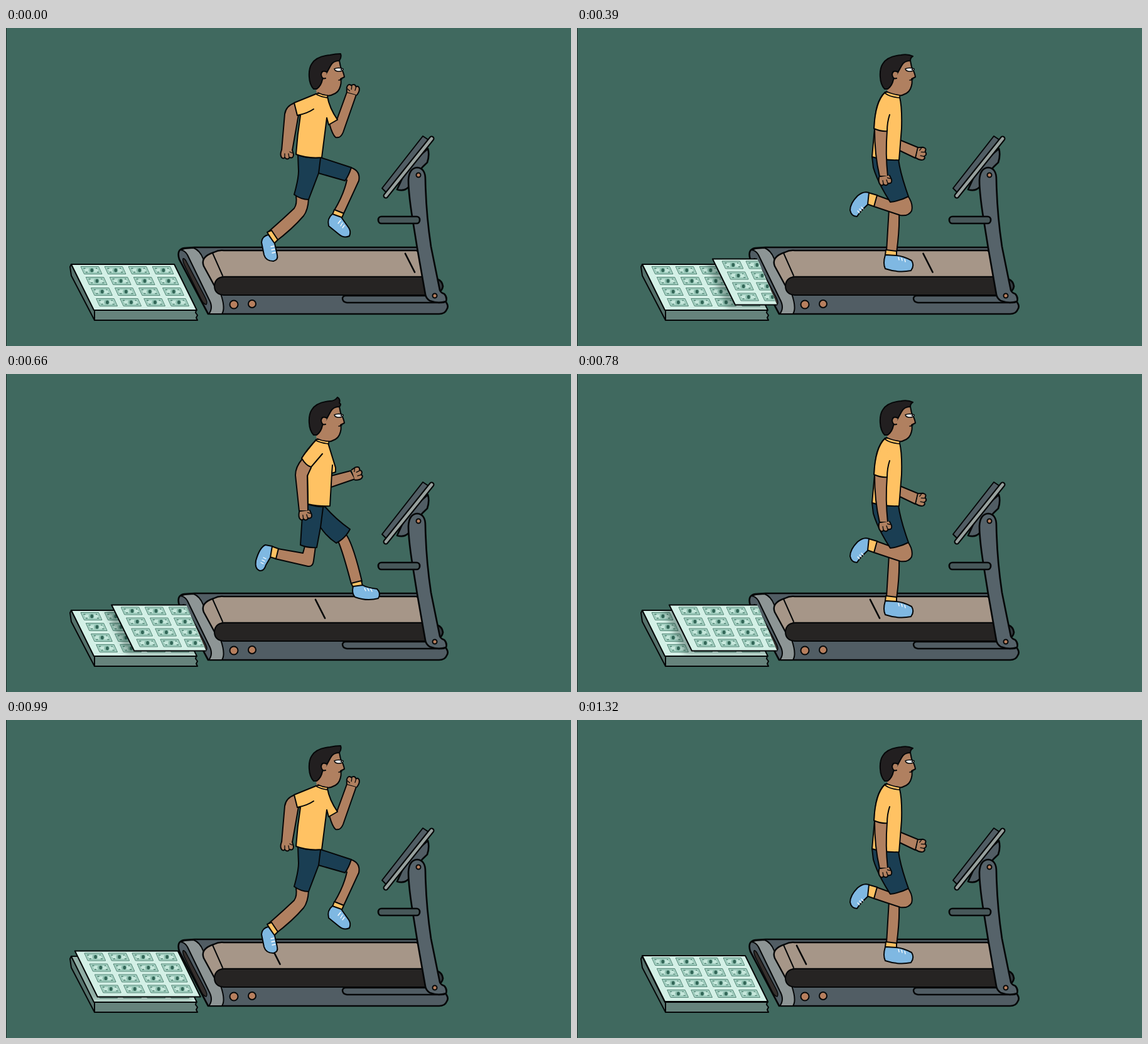
Recreate the animation shown at these times as an HTML page. Size 900 by 506 pixels, loop 1.35 s.

```html
<!DOCTYPE html>
<html lang="en">
<head>
<meta charset="utf-8">
<title>Money treadmill</title>
<style>
html, body { margin: 0; width: 100%; height: 100%; overflow: hidden; background: #40695f; }
svg { display: block; width: 100vw; height: 100vh; }
.ink { stroke: #050708; stroke-width: 2; stroke-linejoin: round; stroke-linecap: round; }
.bold { stroke-width: 2.7; }
</style>
</head>
<body>
<svg viewBox="0 0 900 506" preserveAspectRatio="none">
  <defs>
    <g id="bill">
      <path d="M-18.500 -7H12L18.500 7H-12Z" fill="#e4f6ef"/>
      <path d="M-17 -6H11.500L17 6H-11.500Z" fill="#a6d2c3" stroke="#4f8474" stroke-width="1"/>
      <path d="M-13 -3.500H9.500L13 3.500H-9.500Z" fill="#c6e8dc" stroke="#86b5a6" stroke-width=".7"/>
      <ellipse rx="4.500" ry="4.200" fill="#8fc0b0"/>
      <ellipse cx=".8" rx="2.400" ry="3" fill="#326657"/>
      <path d="M-12.500 -3h3M9 3h3M-9 3h3M7 -3h2" stroke="#4c8070" stroke-width="1.300"/>
    </g>
    <g id="sheet">
      <path class="ink" d="M0 0H164L200 73H36Z" fill="#d3f0e6"/>
      <g id="bills"></g>
    </g>
    <clipPath id="outlet"><path d="M0 0V506H347L258 300V0Z"/></clipPath>
    <clipPath id="pileTop"><path d="M104 376H268L304 449H141Z"/></clipPath>
    <filter id="soft" x="-20%" y="-30%" width="140%" height="160%"><feGaussianBlur stdDeviation="4"/></filter>
  </defs>

  <rect width="900" height="506" fill="#40695f"/>
  <rect width="1" height="506" fill="#1f2f2c"/>

  <g class="ink">
    <path d="M104 376L102 380L104 394L141 465V449Z" fill="#55716b"/>
    <path d="M141 449H303L302 453L305 457L303 461L305 465H141Z" fill="#66837c"/>
  </g>
  <use href="#sheet" x="104" y="376"/>
  <g clip-path="url(#pileTop)"><path id="shade" d="M0 0H164L200 73H36Z" fill="#12332b" opacity=".36" filter="url(#soft)"/></g>

  <g class="ink bold">
    <path d="M672 192Q675 202 671 214Q655 228 646 246Q638 262 623 257L640 220Z" fill="#515d64"/>
    <path d="M599 255L664 172L673 178L607 263Z" fill="#515d64" stroke-width="2"/>
    <path d="M605 267L678 176" stroke-width="9"/>
    <path d="M605 267L678 176" stroke="#98a19e" stroke-width="4.500"/>
    <path d="M686 399Q695 402 696 411Q695 418 688 421Z" fill="#343c40"/>
    <path d="M284 350L300 349H656L683 425L697 432Q707 441 702 448Q699 455 690 455H322L276 368Q271 352 284 350Z" fill="#515d64"/>
    <path d="M285 351L299 350Q309 354 314 367L342 423Q350 446 344 455H323Q331 445 323 431L289 361Q285 354 278 353Z" fill="#8d9595" stroke-width="2"/>
    <path d="M282 367Q284 366 287 371L316 426Q322 437 319 440Q315 440 311 432L284 377Q281 370 282 367Z" fill="#352f2d" stroke-width="1.500"/>
    <path d="M331 357Q339 353 347 354H654Q660 356 664 396H346Q333 399 333 412L315 379Q309 364 331 357Z" fill="#a69688" stroke-width="2.500"/>
    <path d="M329 358L345 394" fill="none" stroke-width="2"/>
    <path d="M347 396H664L670 425H347Q332 424 332 410Q333 397 347 396Z" fill="#262423" stroke-width="2"/>
    <path d="M541 426H690L700 430Q703 437 694 437H543Q536 436 536 430Q537 426 541 426Z" fill="#515d64" stroke-width="2.500"/>
    <path d="M641 242Q642 223 655 222Q668 223 668 241Q669 295 677 348L691 417Q692 421 698 423Q703 428 701 435Q688 439 675 434Q669 430 668 424L655 350L646 294Q641 260 641 242Z" fill="#56636a"/>
    <rect x="593" y="300" width="66" height="11" rx="5" fill="#48585a"/>
    <g fill="#b77f5e" stroke-width="2">
      <circle cx="363" cy="440" r="6.500"/><circle cx="392" cy="439" r="6"/>
      <circle cx="657" cy="234" r="3.500"/><circle cx="683" cy="426" r="3.500"/>
    </g>
    <path id="mark" d="M0 359L15 388.500" fill="none"/>
  </g>

  <g clip-path="url(#outlet)"><use id="fresh" href="#sheet"/></g>
  <g id="runner" class="ink"></g>
</svg>

<script>
const LOOP = 1350, STEP = 30, STRIDE = 480, HOLD = 120;
const SKIN = '#b08060', SHIRT = '#ffc263', SHORTS = '#1a3e53', SHOE = '#7fb8e2', HAIR = '#221f20';
const el = id => document.getElementById(id);

const shape = (fill, d, extra = '') => `<path fill="${fill}" ${extra} d="${d}"/>`;
const line = (d, extra = '') => shape('none', d, extra);
const laces = d => line(d, 'stroke="#fff" stroke-width="1.300"');
const BARE = 'stroke="none"';

// Fist hanging from the wrist, turned by an angle
const fist = (x, y, turn) => `<g transform="translate(${x} ${y}) rotate(${turn})">` +
  shape(SKIN, 'M-9 0Q-12 8 -9 12Q-6 15 -4 12Q0 17 4 12Q10 14 10 7L8 0') +
  line('M-4 12V6M3 12L2 6M8 5L4 3', 'stroke-width="1.300"') + '</g>';

const head = tip =>
  shape(SKIN, 'M512 55L531 52L533 62Q538 71 539 78L533 81Q535 88 531 97Q527 107 514 108L495 105L494 97L502 78Z', BARE) +
  line('M531 52L533 62Q538 71 539 78L533 81Q535 88 531 97Q527 106 512 108') +
  shape(HAIR, `M490 97C481 88 481 66 487 57C493 47 505 44 516 43${tip}Q521 52 517 60L511 71L504 82Q502 92 495 97Z`) +
  shape(SKIN, 'M511 70Q503 66 502 74Q503 82 509 80') +
  shape('#fff', 'M523 65Q530 62 537 65Q537 69 530 69Q524 69 523 65Z', 'stroke-width="1.500"') +
  `<circle cx="534" cy="66" r="1.200" fill="#050708" stroke="none"/>` +
  line('M530 83L535 82', 'stroke-width="1.500"');

const collar = (x1, y1, x2, y2) =>
  shape(SHIRT, `M${x1} ${y1}Q${x1 + 8} ${y1 + 4} ${x2} ${y2}V${y2 + 4}Q${x1 + 6} ${y2 + 3} ${x1 - 2} ${y1 + 3}Z`, 'stroke-width="1.600"');

const push =
  shape(SKIN, 'M515 152Q520 170 525 174Q533 176 537 166L558 106L543 102L527 146') + fist(550.5, 104, 196) +
  shape(SKIN, 'M549 222Q565 227 562 243L538 295L523 290Q538 265 543 242') +
  shape(SHIRT, 'M523 289L538 295L535 302L520 297Z') +
  shape(SHOE, 'M520 296Q511 303 514 315L530 328Q538 335 547 331Q550 324 546 318L534 301Z') +
  laces('M529 311L533 306M533 315L536 310M536 318L539 314') +
  shape(SKIN, 'M462 267Q464 280 459 287Q440 305 417 325L428 341Q456 320 474 299Q481 290 482 272') +
  shape(SHIRT, 'M416 325L423 322L433 337L427 343Z') +
  shape(SHOE, 'M418 329Q408 331 407 341L411 361Q414 371 426 371Q434 369 432 361L428 343Z') +
  laces('M422 348L427 347M423 353L428 352M424 358L429 357') +
  shape(SHORTS, 'M465 202Q482 208 501 206L550 222Q546 235 540 243L498 231L482 273Q470 273 459 265Q466 240 466 228Z') +
  line('M501 207L498 231') +
  shape(SKIN, 'M460 119Q446 124 444 137L439 195H456L466 138') + fist(448, 194, 0) +
  shape(SHIRT, 'M496 104Q505 108 512 109Q515 127 528 146L514 154L511 143L503 206Q480 208 462 201Q464 170 469 139L464 139L459 119Z') +
  line('M464 139Q480 136 490 129');

const flight =
  shape(SKIN, 'M516 154Q521 170 527 177Q535 179 540 170L565 133L553 124L528 150') + fist(557, 130, 213) +
  shape(SKIN, 'M549 234Q561 243 565 258L583 312L568 318Q547 272 538 253') +
  shape(SHIRT, 'M567 317L583 311L586 318L570 324Z') +
  shape(SHOE, 'M570 323L585 317Q593 318 608 316Q614 322 610 330Q594 340 576 339Q569 333 570 323Z') +
  laces('M589 319L591 324M594 319L596 324M599 318L601 323') +
  shape(SKIN, 'M468 267Q468 278 462 283L410 300L414 317L472 301Q484 292 487 273') +
  shape(SHIRT, 'M401 302L411 299L415 316L405 319Z') +
  shape(SHOE, 'M402 301Q391 301 388 310L386 333Q388 343 397 343Q404 342 403 333L406 318Z') +
  laces('M398 323L404 324M397 328L403 329M396 333L402 334') +
  shape(SHORTS, 'M472 202Q488 208 506 206L550 233Q545 247 536 256L499 234L488 274Q476 274 464 267L470 225Z') +
  line('M504 207L499 234') +
  shape(SKIN, 'M466 125Q453 137 452 148L453 204H469L476 145') + fist(461, 203, -5) +
  shape(SHIRT, 'M495 104Q504 109 513 109Q519 131 527 148L518 155L514 145L508 206Q488 208 471 202L475 145L465 125Z') +
  line('M474 145Q488 140 497 128');

const land =
  shape(SKIN, 'M518 162L549 154L556 167L518 180') + fist(553, 160, 253) +
  shape(SKIN, 'M529 266Q536 281 550 334L567 330Q554 275 543 257') +
  shape(SHIRT, 'M550 333L566 329L568 337L553 340Z') +
  shape(SHOE, 'M553 338L568 336Q575 340 591 342Q598 349 593 357Q575 362 556 355Q550 349 553 338Z') +
  laces('M571 341L573 345M576 341L578 345M581 342L583 346') +
  shape(SKIN, 'M476 274L473 285L433 278L429 294L481 306Q489 307 490 297L493 275') +
  shape(SHIRT, 'M423 274L434 278L430 294L420 291Z') +
  shape(SHOE, 'M424 274L413 272Q404 276 398 297Q396 310 404 313Q411 314 414 304L421 292Z') +
  laces('M410 292L414 294M408 296L412 298M406 300L410 302') +
  shape(SHORTS, 'M480 207Q497 212 508 211Q525 231 548 247Q540 262 526 269Q511 259 501 244L495 276Q480 277 469 272L472 225Z') +
  line('M505 213L501 244') +
  shape(SHIRT, 'M494 104Q504 109 513 110L525 149V156L519 158L516 210Q500 211 481 207L480 146L471 134Z') +
  shape(SKIN, 'M472 135Q461 148 461 161L467 218H481L480 162L486 149') + fist(476, 218, -8) +
  shape(SHIRT, 'M495 105L471 134Q478 146 486 148L503 128Z', BARE) +
  line('M494 105Q480 119 471 134Q478 146 486 148L504 127') +
  line('M519 158L520 145');

const pass =
  shape(SKIN, 'M514 178L543 190L539 207L514 195') + fist(542, 198, 282) +
  shape(SKIN, 'M497 288L493 355L509 357Q514 321 513 294') +
  shape(SHIRT, 'M492 353L509 355V363L491 361Z') +
  shape(SHOE, 'M491 361Q487 375 491 383Q512 390 532 386Q538 378 533 370Q520 363 509 362Z') +
  laces('M512 365L513 369M517 366L518 370M522 368L523 372') +
  shape(SKIN, 'M527 267Q536 280 533 291Q528 300 515 298L473 284L477 266L499 274') +
  shape(SHIRT, 'M464 262L478 266L473 284L462 280Z') +
  shape(SHOE, 'M465 262Q456 259 447 267Q435 279 435 290Q437 300 446 300Q451 292 463 281Z') +
  laces('M453 285L456 288M450 288L453 291M447 291L450 294') +
  shape(SHORTS, 'M470 205Q490 211 512 209Q515 232 528 268Q515 275 499 277Q479 246 472 222Z') +
  shape(SHIRT, 'M491 102Q503 109 514 110Q518 126 517 160L513 210Q490 211 470 205L474 160Q474 117 491 102Z') +
  shape(SKIN, 'M474 160Q474 202 482 236H495Q491 200 494 163') + fist(490, 236, -10) +
  shape(SHIRT, 'M491 104Q475 117 474 160Q484 165 494 164L497 138Z', BARE) +
  line('M491 102Q475 117 473 160Q484 165 494 164Q494 150 498 138');

const poses = [
  push + head('Q525 41 533 41Q535 46 531 52') + collar(497, 103, 512, 107),
  flight + head('Q523 42 529 33Q534 42 532 52') + collar(496, 103, 513, 108),
  land + head('Q524 43 528 37Q533 40 531 46L533 48Q533 51 531 52') + collar(496, 103, 514, 107),
  pass + head('Q527 41 535 45Q531 47 531 52') + collar(493, 101, 514, 107)
];
el('runner').innerHTML = poses.map(p => `<g>${p}</g>`).join('');
const groups = [...el('runner').children];

let bills = '';
for (let r = 0; r < 4; r++)
  for (let c = 0; c < 4; c++)
    bills += `<use href="#bill" x="${32 + 38 * c + 8.2 * r}" y="${9.5 + 17 * r}"/>`;
el('bills').innerHTML = bills;

const move = (node, x, y) => node.setAttribute('transform', `translate(${x} ${y})`);

function draw(t) {
  const pose = Math.floor((t + HOLD / 2) % STRIDE / HOLD);
  groups.forEach((g, i) => { g.style.display = i === pose ? '' : 'none'; });
  move(el('mark'), 636 - t * 6.5 / STEP, 0);

  // The printed sheet slides out, then settles on the pile
  const x = Math.max(104, 285 - 0.177 * t);
  const y = 367.5 + Math.max(0, t - 1022) * 0.025;
  const shown = t >= STEP ? '' : 'none';
  el('fresh').style.display = el('shade').style.display = shown;
  move(el('fresh'), x, y);
  move(el('shade'), x - (376 - y) * 1.3, y + 5);
}

function tick(now) {
  draw(Math.floor(now % LOOP / STEP) * STEP);
  requestAnimationFrame(tick);
}
draw(0);
requestAnimationFrame(tick);
</script>
</body>
</html>
```
